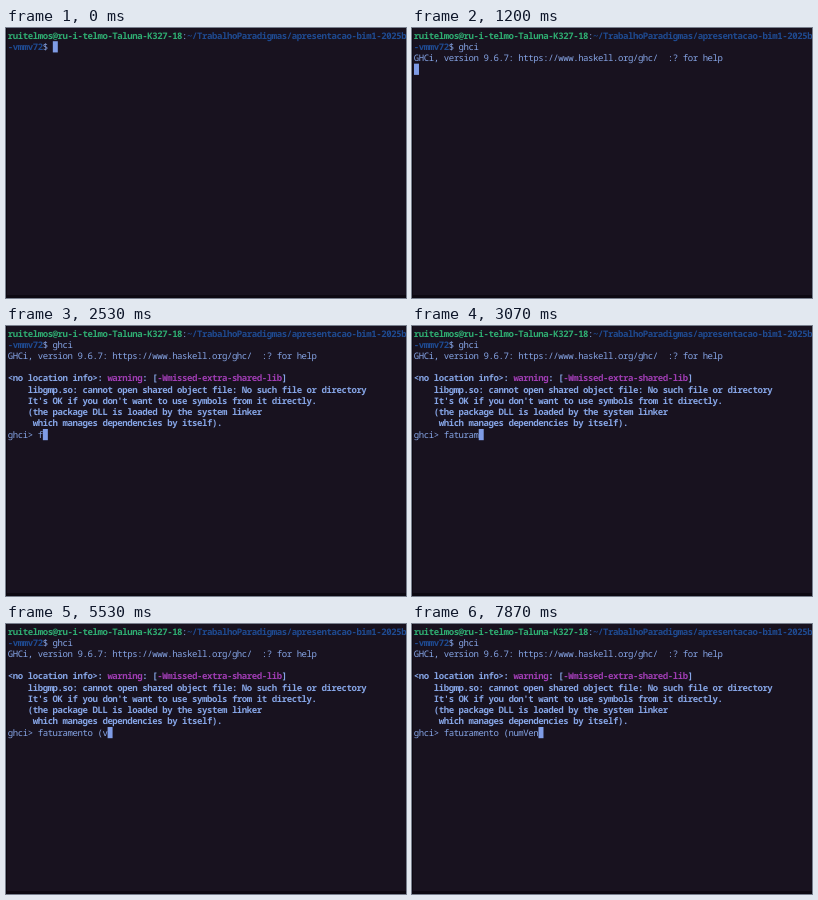
Animation of 400 by 270 pixels, one loop 8 s. Source, as an HTML page with a canvas:

```html
<!DOCTYPE html>
<html lang="en">
<head>
<meta charset="utf-8">
<title>Terminal session</title>
<style>
  html, body { margin: 0; height: 100%; overflow: hidden; background: #18121f; }
  canvas { display: block; }
</style>
</head>
<body>
<canvas id="screen" width="400" height="270"></canvas>
<script>
const ctx = document.getElementById('screen').getContext('2d');
const LOOP = 8000, CELL = 4.98, LINE = 11.22, LEFT = 2, TOP = 2;
const BACK = '#18121f', EDGE = '#0d0912', TEXT = '#86a5e6', CURSOR = '#7f9ce6';
const GREEN = '#2fae72', BLUE = '#1f4b92', MAGENTA = '#a03db4';

const BACKSPACE = '\b';
const shellKeys = [[200, 'g'], [330, 'h'], [470, 'c'], [670, 'i']];
const ghciKeys = [
  ...[...'faturamento'].map((key, i) => [2530 + i * 87, key]),
  [3670, ' '], [4470, '('], [5530, 'v'], [5870, BACKSPACE], [6330, 'n'],
  [6930, 'u'], [7130, 'm'], [7470, 'V'], [7800, 'e'], [7870, 'n']
];
const ENTER = 1130, BANNER = 1200, WARNING = 1330, PROMPT = 1400;

const warningBody = [
  '    libgmp.so: cannot open shared object file: No such file or directory',
  "    It's OK if you don't want to use symbols from it directly.",
  '    (the package DLL is loaded by the system linker',
  '     which manages dependencies by itself).'
];

function typed(keys, t) {
  return keys.filter(([at]) => at <= t)
    .reduce((text, [, key]) => key === BACKSPACE ? text.slice(0, -1) : text + key, '');
}

// Draws text on the character grid and returns the next column.
function write(row, col, text, color = TEXT, weight = 400) {
  ctx.font = `${weight} 9px "Noto Sans Mono", monospace`;
  ctx.fillStyle = color;
  for (const char of text) {
    ctx.fillText(char, LEFT + (col + 0.5) * CELL, TOP + row * LINE + 8.6);
    col++;
  }
  return col;
}

const bold = (row, col, text, color) => write(row, col, text, color, 700);

function cursor(row, col) {
  ctx.fillStyle = CURSOR;
  ctx.fillRect(LEFT + col * CELL, TOP + row * LINE, CELL, LINE);
}

function drawWarning() {
  let col = bold(4, 0, '<no location info>: ');
  col = bold(4, col, 'warning', MAGENTA);
  col = bold(4, col, ': [');
  col = bold(4, col, '-Wmissed-extra-shared-lib', MAGENTA);
  bold(4, col, ']');
  warningBody.forEach((line, i) => bold(5 + i, 0, line));
}

function draw(t) {
  ctx.fillStyle = EDGE;
  ctx.fillRect(0, 0, 400, 270);
  ctx.fillStyle = BACK;
  ctx.fillRect(1, 0, 399, 267);
  ctx.textAlign = 'center';
  ctx.textRendering = 'geometricPrecision';

  let col = bold(0, 0, 'ruitelmos@ru-i-telmo-Taluna-K327-18', GREEN);
  col = write(0, col, ':');
  bold(0, col, '~/TrabalhoParadigmas/apresentacao-bim1-2025b', BLUE);
  col = bold(1, 0, '-vmmv72', BLUE);
  col = write(1, col, '$ ' + typed(shellKeys, t));

  if (t < ENTER) return cursor(1, col);
  if (t < BANNER) return cursor(2, 0);
  write(2, 0, 'GHCi, version 9.6.7: https://www.haskell.org/ghc/  :? for help');
  if (t < WARNING) return cursor(3, 0);
  drawWarning();
  if (t < PROMPT) return cursor(9, 0);
  cursor(9, write(9, 0, 'ghci> ' + typed(ghciKeys, t)));
}

function tick() {
  draw(performance.now() % LOOP);
  requestAnimationFrame(tick);
}
tick();
</script>
</body>
</html>
```
